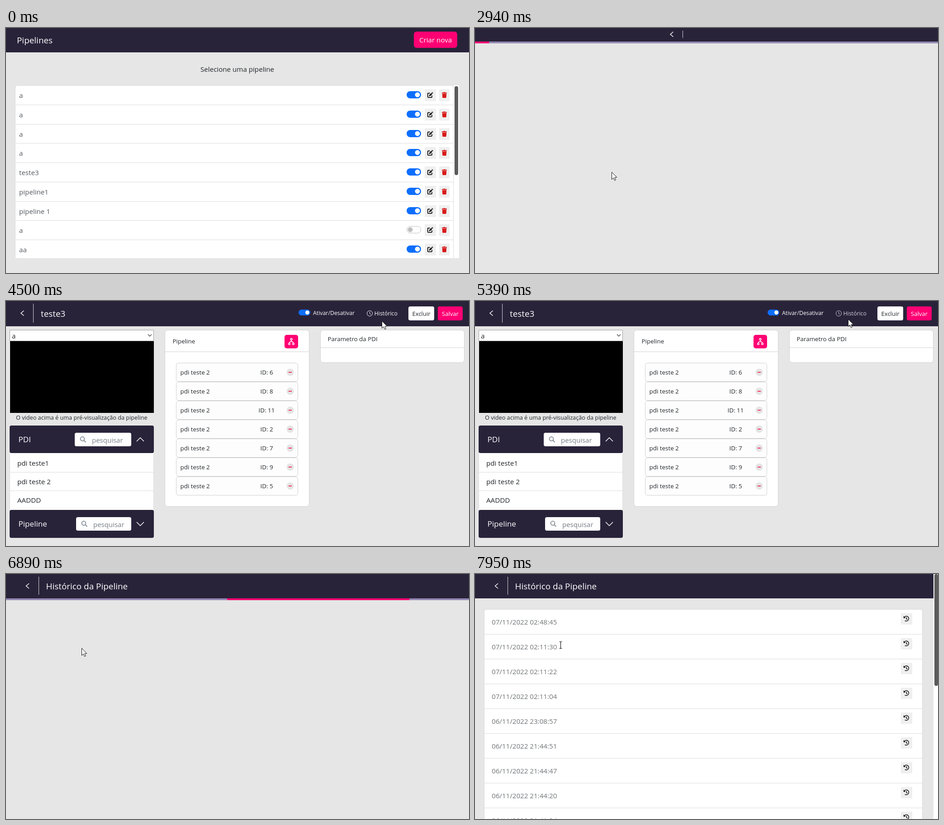
Write an HTML page with a canvas that moves like this. It is 1024 by 543 pixels and loops after 8000 ms.

```html
<!DOCTYPE html>
<html lang="pt">
<head>
<meta charset="utf-8">
<title>Pipelines</title>
<style>
html, body { margin: 0; width: 100%; height: 100%; overflow: hidden; background: #e6e6e6; }
canvas { display: block; width: 100%; height: 100%; }
</style>
</head>
<body>
<canvas id="stage" width="1024" height="543"></canvas>
<script>
const c = document.getElementById('stage').getContext('2d');
const LOOP = 8000, DARK = '#29233a', PINK = '#ff0073', BLUE = '#0d6efd', INK = '#212529', LINE = '#dcdcdc';

// time, x, y of the pointer tip
const path = [
  [1060, 474, 540], [1200, 472, 505], [1500, 400, 330], [1840, 340, 236], [1930, 337, 234],
  [2490, 302, 319], [3400, 302, 319], [3610, 350, 282], [4100, 710, 112], [4440, 823, 47],
  [4500, 831, 44], [4700, 831, 44], [5240, 825, 40], [5800, 825, 40], [6170, 640, 90],
  [6600, 260, 156], [6890, 167, 164], [7400, 172, 172], [7830, 189, 157], [8000, 189, 157]
];

function slope(i, k) {
  const a = path[i - 1], b = path[i], d = path[i + 1];
  if (!a || !d || (b[k] - a[k]) * (d[k] - b[k]) <= 0) return 0;
  return (d[k] - a[k]) / (d[0] - a[0]);
}

function pointer(t) {
  const i = path.findIndex((p, n) => n && t <= p[0]) - 1, a = path[i], b = path[i + 1];
  const d = b[0] - a[0], u = (t - a[0]) / d, v = 1 - u;
  return [1, 2].map(k => v * v * (1 + 2 * u) * a[k] + u * u * (3 - 2 * u) * b[k]
    + d * u * v * (v * slope(i, k) - u * slope(i + 1, k)));
}

function bezier(x, x1, y1, x2, y2) {
  const at = (s, p, q) => 3 * (1 - s) * (1 - s) * s * p + 3 * (1 - s) * s * s * q + s * s * s;
  let lo = 0, hi = 1;
  for (let i = 0; i < 24; i++) {
    const m = (lo + hi) / 2;
    if (at(m, x1, x2) < x) lo = m; else hi = m;
  }
  return at(lo, y1, y2);
}

function rect(x, y, w, h, fill) { c.fillStyle = fill; c.fillRect(x, y, w, h); }

function box(x, y, w, h, r, fill, line) {
  c.beginPath();
  c.roundRect(x, y, w, h, r);
  if (fill) { c.fillStyle = fill; c.fill(); }
  if (line) { c.strokeStyle = line; c.lineWidth = 1; c.stroke(); }
}

function disc(x, y, r, fill) {
  c.beginPath();
  c.arc(x, y, r, 0, 7);
  c.fillStyle = fill;
  c.fill();
}

function text(s, x, y, size = 15.15, fill = INK, align = 'left') {
  c.font = size + 'px "Open Sans", "Noto Sans", sans-serif';
  c.textAlign = align;
  c.fillStyle = fill;
  c.fillText(s, x, y);
}

function stroke(d, x, y, color, width) {
  c.save();
  c.translate(x, y);
  c.strokeStyle = color;
  c.lineWidth = width;
  c.stroke(new Path2D(d));
  c.restore();
}

function shape(d, x, y, color) {
  c.save();
  c.translate(x, y);
  c.fillStyle = color;
  c.fill(new Path2D(d));
  c.restore();
}

function toggle(x, y, w, h, on) {
  const r = h / 2;
  if (on) {
    box(x, y, w, h, r, BLUE);
    disc(x + w - r, y + r, r * .68, '#fff');
  } else {
    box(x + .5, y + .5, w - 1, h - 1, r, '#fff', '#bfbfbf');
    disc(x + r, y + r, r * .68, '#bfbfbf');
  }
}

function header(h, w = 1024) { rect(0, 0, w, h, DARK); }

function back(x, y, lineX, top, bottom) {
  stroke('M3.5-5.5L-3 0L3.5 5.5', x, y, '#fff', 1.5);
  rect(lineX, top, 1, bottom - top, '#d8d6dc');
}

// two bars chasing each other
function progress(y, ms) {
  rect(0, y, 1024, 4, '#9489b4');
  const bar = (age, curve, from, span, reach) => {
    if (age < 0) return;
    const p = bezier(Math.min(age % 2100 / 1260, 1), ...curve);
    const l = Math.max(0, from + span * p), r = Math.min(1, reach * p);
    if (r > l) rect(l * 1024, y, (r - l) * 1024, 4, PINK);
  };
  const e = ms * 1.081;
  bar(e, [.65, .815, .735, .395], -.35, 1.35, 1.9);
  bar(e - 1150, [.165, .84, .44, 1], -2, 3.07, 1.08);
}

function editIcon(x, y) {
  stroke('M-.5-4H-4Q-5.3-4-5.3-2.7V4Q-5.3 5.3-4 5.3H2.7Q4 5.3 4 4V1', x, y, '#111', 1.8);
  shape('M-2.5 3L-1.9 0L2.6-4.5L4.9-2.2L.4 2.3ZM3.3-5.2L4-5.9Q4.7-6.4 5.4-5.8L6.2-5Q6.8-4.3 6.2-3.6L5.6-2.9Z', x, y, '#111');
}

function trashIcon(x, y) {
  shape('M-5.5-5.5H-2.2L-1.6-6.5H1.6L2.2-5.5H5.5V-3.8H-5.5ZM-4.8-3H4.8L4.2 5.4Q4 6.5 3 6.5H-3Q-4 6.5-4.2 5.4Z', x, y, '#d91a1a');
}

function historyIcon(x, y) {
  stroke('M-4.3-3.4A5.4 5.4 0 1 1-3.2 4.3M.3-3V.3L2.3 2.1', x, y, '#111', 1.5);
  shape('M-6.2-6V-1.3H-1.5Z', x, y, '#111');
}

function list(cursor, pressed) {
  header(54);
  text('Pipelines', 24, 34, 18.9, '#fff');
  box(902, 8, 96, 36, 6, PINK);
  text('Criar nova', 914, 32, 15.15, '#fff');
  text('Selecione uma pipeline', 430, 97);
  c.save();
  c.beginPath();
  c.rect(0, 127, 1024, 383);
  c.clip();
  box(20.5, 127.5, 969, 420, [5, 5, 0, 0], '#fff', LINE);
  ['a', 'a', 'a', 'a', 'teste3', 'pipeline1', 'pipeline 1', 'a', 'aa'].forEach((name, i) => {
    const y = Math.round(42.75 * i), next = Math.round(42.75 * (i + 1));
    if (cursor && cursor[1] >= 128 + y && cursor[1] < 128 + next && cursor[1] < 510)
      rect(21, 128 + y, 968, next - y - 1, pressed ? '#e9ecef' : '#f9f9f9');
    rect(21, 127 + next, 968, 1, LINE);
    text(name, 29, 155 + y, 15.15, '#555a60');
    toggle(886, 140 + y, 32, 16, i != 7);
    rect(926, 136 + y, 25, 26, '#efefef');
    editIcon(938, 148.5 + y);
    rect(958, 136 + y, 23, 26, '#efefef');
    trashIcon(969.5, 148.5 + y);
  });
  c.restore();
  rect(990, 127, 12, 383, '#fff');
  box(992, 129, 8, 197, 4, '#5b5b5b');
}

function search(x, y, hint) {
  box(x, y, 277 - x, 30, 4, '#fff');
  c.beginPath();
  c.arc(x + 17, y + 13.5, 4.4, 0, 7);
  c.strokeStyle = '#8d959c';
  c.lineWidth = 2;
  c.stroke();
  stroke('M0 0L4.5 4.5', x + 20, y + 16.5, '#8d959c', 2.2);
  c.save();
  c.beginPath();
  c.rect(x, y, 264 - x, 30);
  c.clip();
  text(hint, x + 38, y + 22, 15, '#757d85');
  c.restore();
}

function editor(hover) {
  header(56);
  back(36, 27, 60, 6, 48);
  text('teste3', 77, 35, 18.9, '#fff');
  toggle(647, 19, 26, 13, true);
  text('Ativar/Desativar', 679, 31, 12.35, '#fff');
  const link = hover ? '#d3d0da' : '#fff';
  stroke('M6 0A6 6 0 1 1-6 0A6 6 0 1 1 6 0M0-3.7V.5L2.8 2', 804.5, 27.5, link, 1);
  text('Histórico', 814.5, 32, 12.35, link);
  box(890, 12, 57, 31, 4, '#fff');
  text('Excluir', 898.5, 33, 13.1);
  box(955, 12, 55, 31, 4, PINK);
  text('Salvar', 964, 33, 13.1, '#fff');

  box(8.5, 64.5, 318, 24, 0, '#fff', '#a0a0a0');
  text('a', 13, 83);
  stroke('M-4-2L0 2L4-2', 318, 76, '#444', 1.3);
  rect(9, 89, 318, 159, '#000');
  text('O video acima é uma pré-visualização da pipeline', 22, 263, 12.7);

  box(8.5, 330.5, 318, 140, 0, '#fff', LINE);
  box(8, 276, 319, 61, 4, DARK);
  text('PDI', 27.5, 313, 17.1, '#fff');
  search(152, 292, 'pesquisar PDI');
  stroke('M-8 4L0-4L8 4', 297, 307, '#fff', 1.5);
  ['pdi teste1', 'pdi teste 2', 'AADDD'].forEach((name, i) => {
    text(name, 25, 365 + 41 * i);
    if (i) rect(9, 338 + 41 * i, 317, 1, LINE);
  });
  box(8, 463, 319, 62, 4, DARK);
  text('Pipeline', 27.5, 500, 17.1, '#fff');
  search(155, 479, 'pesquisar pipeline');
  stroke('M-8-4L0 4L8-4', 297, 494, '#fff', 1.5);

  box(351.5, 64.5, 319, 391, 6, '#fff', '#d2d2d2');
  rect(352, 112, 318, 1, '#d2d2d2');
  text('Pipeline', 368.5, 94, 13.4);
  box(616, 75, 30, 30, 5, PINK);
  stroke('M0-3.5V0M-4.5 3.5Q-4.5 0 0 0Q4.5 0 4.5 3.5', 631, 90, '#fff', 1.5);
  [[0, -5.3], [-4.5, 5], [4.5, 5]].forEach(([x, y]) => {
    disc(631 + x, 90 + y, 2.6, '#fff');
    disc(631 + x, 90 + y, 1.1, PINK);
  });
  [6, 8, 11, 2, 7, 9, 5].forEach((id, i) => {
    const y = 42 * i;
    box(376.5, 137.5 + y, 269, 41, 5, '#fdfdfd', '#cfcfcf');
    text('pdi teste 2', 385.5, 163 + y, 13.4);
    text('ID: ' + id, 576.5, 163 + y, 13.4, INK, 'center');
    disc(628.5, 158 + y, 8, '#e4e4e4');
    rect(625, 157 + y, 7, 2, '#f5305f');
  });

  box(695.5, 64.5, 318, 72, 6, '#fff', '#d2d2d2');
  rect(696, 103, 317, 1, '#d2d2d2');
  text('Parametro da PDI', 711.5, 89, 13.4);
}

function historyHeader(w) {
  header(54, w);
  back(47.5, 26.5, 72, 6, 46);
  text('Histórico da Pipeline', 88.5, 34, 18.9, '#fff');
}

function history() {
  rect(1014, 0, 10, 543, '#fff');
  historyHeader(1014);
  box(1016, 0, 8, 248, 4, '#5b5b5b');
  box(20.5, 78.5, 969, 500, 5, '#fff', LINE);
  ['07/11/2022 02:48:45', '07/11/2022 02:11:30', '07/11/2022 02:11:22', '07/11/2022 02:11:04',
    '06/11/2022 23:08:57', '06/11/2022 21:44:51', '06/11/2022 21:44:47', '06/11/2022 21:44:20',
    '06/11/2022 21:41:34'].forEach((stamp, i) => {
    const y = 55 * i;
    text(stamp, 37, 112 + y, 15.15, '#6f7376');
    rect(942, 87 + y, 25, 25, '#efefef');
    historyIcon(954, 99 + y);
    rect(21, 133 + y, 968, 1, LINE);
  });
}

function drawPointer([x, y], beam) {
  if (beam) {
    stroke('M-3-7.5H-1Q0-7.5 0-6.5Q0-7.5 1-7.5H3M0-7V7M-3 7.5H-1Q0 7.5 0 6.5Q0 7.5 1 7.5H3', x + .5, y + .5, '#000', 1.1);
    return;
  }
  const arrow = 'M0 0V16L3.7 12.6L6.2 18.3L8.8 17.2L6.4 11.6H11.3Z';
  shape(arrow, x + .5, y + .5, '#fff');
  stroke(arrow, x + .5, y + .5, '#111', 1);
}

function draw(t) {
  const cursor = t >= 1060 ? pointer(t) : null;
  rect(0, 0, 1024, 543, '#e6e6e6');
  if (t < 2905) list(cursor, t >= 2810);
  else if (t < 3350) {
    header(30);
    back(435, 14, 459, 6, 22);
    progress(30, t - 2926);
  } else if (t < 5420) editor(t >= 4700);
  else if (t < 7830) {
    historyHeader(1024);
    progress(54, t - 5427);
  } else history();
  if (cursor) drawPointer(cursor.map(Math.round), t >= 7830);
}

const start = performance.now();
function tick() {
  draw((performance.now() - start) % LOOP);
  requestAnimationFrame(tick);
}
tick();
</script>
</body>
</html>
```
